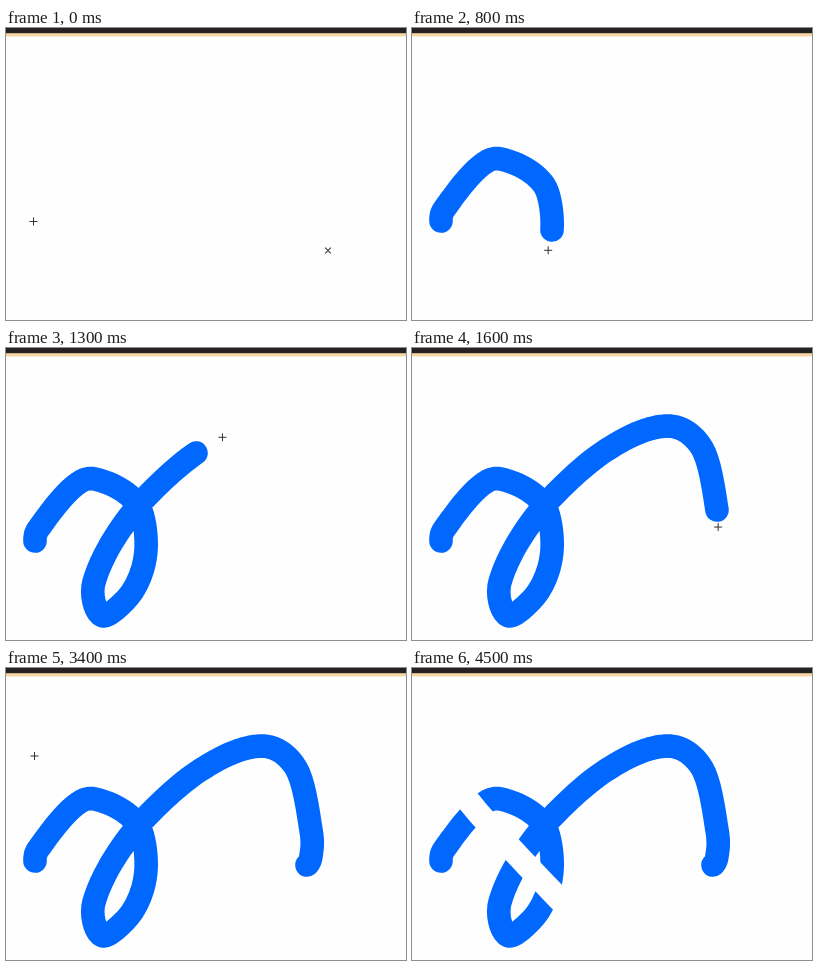
An HTML page with a canvas for the animation above (4600 ms loop, 400 by 292 pixels).

```html
<!DOCTYPE html>
<html lang="en">
<head>
<meta charset="utf-8">
<style>
  html, body { margin: 0; height: 100%; overflow: hidden; background: #fefefe; }
  canvas { display: block; }
</style>
</head>
<body>
<canvas id="stage" width="400" height="292"></canvas>
<script>
const ctx = document.getElementById('stage').getContext('2d');
const LOOP = 4600, STEP = 100, BRUSH = 23.6, POINTER_LEAD = 47;
const PAPER = '#fefefe', BLUE = '#0068ff';

// Key points [time in ms, x, y], joined by a smooth curve.
const drawing = [
  [200, 29, 193], [240, 31, 183], [400, 65, 141], [520, 89, 131],
  [700, 132, 157], [800, 140, 202], [900, 126, 244], [970, 97, 268],
  [1060, 88, 234], [1200, 127, 164], [1300, 190, 105], [1420, 254, 78],
  [1510, 290, 100], [1600, 305, 162], [1690, 305, 188], [1800, 301, 197]
];
const toTools = [[1800, 301, 200], [2000, 210, 255], [2200, 71, 291], [2400, 46, 310]];
const fromTools = [[2600, 46, 310], [2700, 47, 276], [3200, 44, 118], [3400, 28.5, 88], [3500, 36, 106]];
const erasing = [[3500, 36, 106], [3650, 70, 149], [3850, 149, 233]];
const leaving = [[3850, 149, 233], [4400, 43, 283], [4500, 40, 310]];

// Velocity along one axis at a key point; the ends are at rest.
function velocity(path, i, axis) {
  const before = path[i - 1], after = path[i + 1];
  return before && after ? (after[axis] - before[axis]) / (after[0] - before[0]) : 0;
}

// Cubic Hermite interpolation through the key points.
function pointAt(path, t) {
  const last = path.length - 1;
  const time = Math.min(Math.max(t, path[0][0]), path[last][0]);
  const i = Math.max(1, path.findIndex(p => p[0] >= time));
  const a = path[i - 1], b = path[i], span = b[0] - a[0];
  const k = (time - a[0]) / span, r = 1 - k;
  return [1, 2].map(axis =>
    r * r * (1 + 2 * k) * a[axis] + k * k * (3 - 2 * k) * b[axis] +
    span * k * r * (r * velocity(path, i - 1, axis) - k * velocity(path, i, axis)));
}

function brush(path, t, color) {
  const begin = path[0][0], end = Math.min(t, path[path.length - 1][0]);
  if (t < begin) return;
  ctx.strokeStyle = color;
  ctx.lineWidth = BRUSH;
  ctx.lineCap = ctx.lineJoin = 'round';
  ctx.beginPath();
  ctx.moveTo(...pointAt(path, begin));
  for (let time = begin; time <= end; time += 10) ctx.lineTo(...pointAt(path, time));
  ctx.stroke();
}

function cross(x, y, arm, angle = 0) {
  ctx.save();
  ctx.translate(x, y);
  ctx.rotate(angle);
  ctx.strokeStyle = '#333';
  ctx.lineWidth = 1;
  ctx.lineCap = 'butt';
  ctx.beginPath();
  ctx.moveTo(-arm, 0);
  ctx.lineTo(arm, 0);
  ctx.moveTo(0, -arm);
  ctx.lineTo(0, arm);
  ctx.stroke();
  ctx.restore();
}

function pointer(t) {
  if (t < 200) return [27.5, 193.5];
  if (t < 1800) return pointAt(drawing, t + POINTER_LEAD);
  const path = [leaving, erasing, fromTools, toTools].find(p => t >= p[0][0]);
  return pointAt(path, t);
}

function render(now) {
  const t = Math.floor(now % LOOP / STEP) * STEP;
  ctx.fillStyle = PAPER;
  ctx.fillRect(0, 0, 400, 292);
  brush(drawing, t, BLUE);
  brush(erasing, t, PAPER);
  ctx.fillStyle = '#f5d6a4';
  ctx.fillRect(0, 5, 400, 3.5);
  ctx.fillStyle = '#252122';
  ctx.fillRect(0, 0, 400, 5.2);
  cross(...pointer(t), 4);
  if (t < STEP) cross(322, 222.5, 4, Math.PI / 4);
}

const start = performance.now();
function tick() {
  render(performance.now() - start);
  requestAnimationFrame(tick);
}
tick();
</script>
</body>
</html>
```
